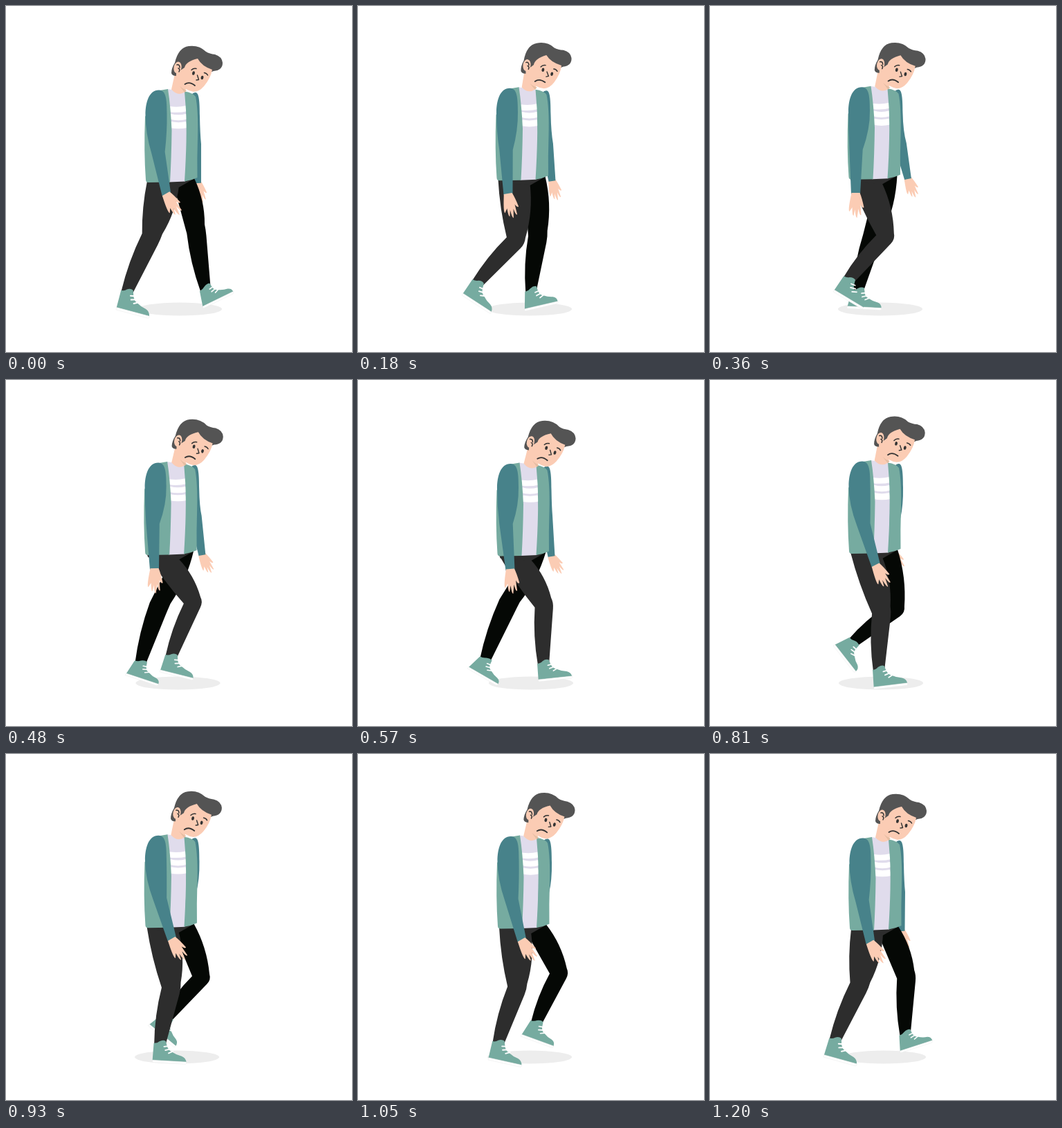
An HTML page for the animation above (1.23 s loop, 500 by 500 pixels).

```html
<!DOCTYPE html>
<html lang="en">
<head>
<meta charset="utf-8">
<title>Sad walk</title>
<style>
html, body { margin: 0; width: 100%; height: 100%; overflow: hidden; background: #fff; }
svg { display: block; width: 100vw; height: 100vh; }
.line { fill: none; stroke: #333; stroke-linecap: round; stroke-linejoin: round; }
.white { fill: none; stroke: #fff; }
</style>
</head>
<body>
<svg viewBox="0 0 500 500">
  <defs>
    <g id="shoe">
      <path fill="#76aba0" d="M0-3 L1-27 Q6-27 9-30 Q14-33 18-31 L20-25 Q22-18 28-16 Q35-12 42-11 Q48-9 49-3Z"/>
      <path fill="#fff" stroke="#e6e6e6" stroke-width=".4" d="M0-3.2 L49-3.2 Q50-1 48 0 L0 0Z"/>
      <path class="white" stroke-width="1.8" stroke-linecap="round" d="M16-23 L22-24 M18-18 L25-20 M23-14 L29-17"/>
    </g>
    <path id="hand" fill="#fbccb4" stroke-linejoin="round" d="M-6-2 L6-2 Q9 5 12 19 Q10 21 7 15 L8 30 Q6 32 4 21 L2 34 Q0 35 -1 22 L-3 31 Q-5 32 -5 19 L-9 25 Q-11 24 -8 8Z"/>
  </defs>

  <ellipse id="shadow" cy="438" rx="61" ry="9.5" fill="#ededed"/>
  <use id="farHand" href="#hand"/>
  <path id="farArm" fill="#47828a"/>
  <path id="farLeg" fill="#050805"/>
  <use id="farShoe" href="#shoe"/>
  <path id="nearLeg" fill="#2d2d2d"/>
  <use id="nearShoe" href="#shoe"/>

  <g id="torso">
    <path fill="#2d2d2d" d="M204 250 L272 245 L271 250 L250 262 L206 258Z"/>
    <path fill="#e0dcec" d="M233 120 L259 124 Q263 170 259 253.5 L236 254.5Z"/>
    <g class="white" stroke-width="8">
      <path d="M236 149 Q249 151 261 148"/>
      <path d="M237 159.5 Q249 163 261.500 159.500"/>
      <path stroke-width="9" d="M238 171.500 Q249 174 261 171.500"/>
    </g>
    <path fill="#76aba0" d="M222 122 L234 120 Q238 146 239.500 180 Q239 220 237 254.500 L206 255 Q202 255 202 251 Q199 210 201 160Z"/>
    <path fill="#76aba0" d="M258 123.500 Q270 125 274 131 Q278 150 277 190 Q276 220 276.500 248 Q268 252 258 253.500 Q262 190 260 150Z"/>
  </g>
  <path id="nearArm" fill="#47828a"/>
  <use id="nearHand" href="#hand"/>

  <g id="head">
    <path fill="#fbccb4" d="M244 98 L239 120.500 Q248 131 258 124.500 L263 112Z"/>
    <path fill="#545454" d="M246 101 Q240 101 239 97 Q239 90 244 82 Q249 60 264 58 Q279 56 289 66 Q294 69 302 70 Q312 73 313 82 Q313 93 300 94 L285 100 L258 100Z"/>
    <path fill="#fbccb4" d="M258 89 Q260 80 277 76 Q283 87 298 92 Q296 104 286 116 Q279 124 271 124 Q259 122 250 111 Q245 105 246 97Z"/>
    <path fill="#e5bda2" d="M251 115.500 Q255 120 261 122 L258 125Z"/>
    <ellipse cx="248" cy="89" rx="5.500" ry="8.500" fill="#fbccb4" transform="rotate(12 248 89)"/>
    <path class="line" stroke-width="1.500" d="M247 85 Q251 84 251 89 M249 90 Q252 91 250 95"/>
    <ellipse cx="271" cy="97" rx="1.900" ry="2.800" fill="#333" transform="rotate(15 271 97)"/>
    <ellipse cx="283.500" cy="103.500" rx="1.900" ry="2.800" fill="#333" transform="rotate(15 283.500 103.500)"/>
    <path class="line" stroke-width="1.500" d="M268 92.500 Q271 89.500 275 90.500 M286.500 96.500 Q290 97 291.500 100"/>
    <path class="line" stroke-width="1.400" d="M276.500 100 L278.500 106.500 L275 107"/>
    <path class="line" stroke-width="1.800" d="M258.500 113 Q265 108.500 273 115"/>
  </g>
</svg>
<script>
const LOOP = 1230, STEP = 30;
const $ = id => document.getElementById(id);

// time, knee x y, ankle x y, heel x y, sole angle
const nearLegKeys = [
  [0, 210, 333, 175, 413, 159, 439, 14.8],
  [180, 228, 339, 173, 400, 150, 418, 33],
  [270, 243, 336, 183, 392, 158, 407, 40],
  [360, 254, 334, 201, 395, 178, 413, 31],
  [465, 270, 322, 234, 398, 216, 420, 17],
  [570, 269, 325, 268, 409, 261, 436, -6],
  [660, 263, 328, 278, 411, 274, 438, -18],
  [810, 248, 336, 244, 418, 237, 447, -7],
  [1050, 230, 338, 203, 417, 188, 442, 12.5],
  [1200, 216, 334, 181, 413, 164, 438, 15.5]
];
const farLegKeys = [
  [0, 275, 326, 288, 408, 285, 437, -26],
  [180, 260, 333, 250, 411, 241, 441, -13],
  [360, 235, 333, 214, 411, 198, 437, 3],
  [570, 217, 323, 184, 404, 158, 417, 30],
  [690, 244, 331, 187, 390, 161, 403, 42],
  [810, 269, 331, 207, 379, 178, 384, 52],
  [1050, 291, 317, 258, 388, 235, 408, 20],
  [1200, 284, 322, 282, 404, 275, 432, -18]
];
// time, elbow x y, wrist x y, hand angle
const nearArmKeys = [
  [0, 220, 212, 232, 273, 30],
  [180, 214, 208, 217, 273, 10],
  [360, 211, 207, 210.5, 272, 0],
  [570, 214, 208, 220, 275, 4],
  [810, 222, 209, 240, 269, 27],
  [1050, 222, 211, 237, 270, 30],
  [1200, 220, 212, 232, 273.5, 30]
];
const farArmKeys = [
  [0, 273, 200, 277, 256, -12],
  [180, 273, 200, 280.5, 253, -14],
  [360, 275, 200, 286, 250, -20],
  [570, 272, 196, 279.5, 255, -28],
  [810, 266, 200, 264, 249, -26],
  [1050, 267, 200, 262, 248, -10],
  [1200, 273, 200, 276.5, 256, -12]
];
// time, torso x y, head x y, head angle, shadow x
const bodyKeys = [
  [0, 0, 0, 0, 0, 0, 251],
  [180, -1.5, -2.8, -2.4, -3.6, -3, 248],
  [360, -1.5, -4.3, -0.8, -4.4, -1, 246],
  [570, -0.5, -0.5, 0.6, 0.6, 1.5, 250],
  [810, -1, -4, -1.3, -4.6, -1.5, 247],
  [1050, 0, -2.6, 0.2, -1.8, 0.5, 248],
  [1200, 0, 0, 0, 0, 0, 251]
];

// cyclic cubic through the keys
function sample(keys, t) {
  const n = keys.length;
  let i = n - 1;
  while (keys[i][0] > t) i--;
  const key = j => keys[(j + n) % n];
  const time = j => key(j)[0] + LOOP * Math.floor(j / n);
  const t1 = time(i), t2 = time(i + 1), d = t2 - t1, u = (t - t1) / d;
  const a = u * u * (3 - 2 * u), b = u * (1 - u) * (1 - u), c = u * u * (u - 1);
  return key(i).slice(1).map((p, k) => {
    const v = j => key(j)[k + 1];
    const m1 = (v(i + 1) - v(i - 1)) / (t2 - time(i - 1));
    const m2 = (v(i + 2) - v(i)) / (time(i + 2) - t1);
    return p + (v(i + 1) - p) * a + d * (m1 * b + m2 * c);
  });
}

const mix = (a, b, u) => [a[0] + (b[0] - a[0]) * u, a[1] + (b[1] - a[1]) * u];
const unit = (a, b) => {
  const d = Math.hypot(b[0] - a[0], b[1] - a[1]);
  return [(b[0] - a[0]) / d, (b[1] - a[1]) / d];
};
// point beside p; positive w lies to the right of a limb heading down
const side = (p, dir, w) => [p[0] + dir[1] * w, p[1] - dir[0] * w];
const bulge = (a, b, w) => side(mix(a, b, 0.5), unit(a, b), w * 2);
const str = p => p[0].toFixed(2) + ' ' + p[1].toFixed(2);
const bisect = (a, b, c) => {
  const p = unit(a, b), q = unit(b, c);
  return unit([0, 0], [p[0] + q[0], p[1] + q[1]]);
};

function legPath(hipL, hipR, knee, ankle, w, fat) {
  const hip = mix(hipL, hipR, 0.5);
  const bend = bisect(hip, knee, ankle), shin = unit(knee, ankle);
  const end = [ankle[0] + shin[0] * 3, ankle[1] + shin[1] * 3];
  const kL = side(knee, bend, -14), kR = side(knee, bend, 14);
  const aL = side(end, shin, -w), aR = side(end, shin, w);
  const r1 = mix(kR, hipR, 0.1), r2 = mix(kR, aR, 0.1);
  return `M${str(hipL)} Q${str(bulge(hipL, kL, -fat))} ${str(kL)}` +
    ` Q${str(bulge(kL, aL, -2.5))} ${str(aL)} L${str(aR)} L${str(r2)}` +
    ` Q${str(kR)} ${str(r1)} Q${str(bulge(hipR, r1, 4))} ${str(hipR)}Z`;
}

function setLeg(name, keys, t, hipL, hipR, w, fat) {
  const [kx, ky, ax, ay, hx, hy, deg] = sample(keys, t);
  $(name + 'Leg').setAttribute('d', legPath(hipL, hipR, [kx, ky], [ax, ay], w, fat));
  // the sole follows its own angle while the collar stays on the ankle
  const c = Math.cos(deg * Math.PI / 180), s = Math.sin(deg * Math.PI / 180);
  const m = [c, s, (ax - hx - 10 * c) / -27, (ay - hy - 10 * s) / -27, hx, hy];
  $(name + 'Shoe').setAttribute('transform', `matrix(${m.map(v => v.toFixed(4))})`);
}

function setArm(name, keys, t, x, y, half, elbowW, wristW, size) {
  const [ex, ey, wx, wy, deg] = sample(keys, t);
  const E = [ex, ey], W = [wx, wy], top = [x, y + 36];
  const bend = bisect(top, E, W), low = unit(E, W);
  const eL = side(E, bend, -elbowW), eR = side(E, bend, elbowW);
  const wL = side(W, low, -wristW), wR = side(W, low, wristW);
  const l = x - half, r = x + half;
  $(name + 'Arm').setAttribute('d',
    `M${x + 4} ${y} C${l + 5} ${y} ${l} ${y + 18} ${l} ${y + 36}` +
    ` Q${l} ${y + 62} ${str(eL)} L${str(wL)} L${str(wR)} L${str(eR)}` +
    ` Q${r + 0.5} ${y + 60} ${r} ${y + 34} C${r} ${y + 14} ${r - 1} ${y} ${x + 4} ${y}Z`);
  $(name + 'Hand').setAttribute('transform',
    `translate(${str(W)}) rotate(${-deg * (name === 'near' ? 1 : -1)}) scale(${size})`);
}

function draw(t) {
  const [bx, by, hx, hy, tilt, sx] = sample(bodyKeys, t);
  const at = (x, y) => [x + bx, y + by];
  $('shadow').setAttribute('cx', sx.toFixed(2));
  $('torso').setAttribute('transform', `translate(${bx} ${by})`);
  $('head').setAttribute('transform', `translate(${hx} ${hy}) rotate(${tilt} 250 120)`);
  setLeg('near', nearLegKeys, t, at(204, 253), at(250, 260), 8, 2);
  setLeg('far', farLegKeys, t, at(242, 258), at(272, 249), 7.5, 0);
  setArm('near', nearArmKeys, t, 217 + bx, 121.5 + by, 15.5, 9.7, 6.5, 1);
  setArm('far', farArmKeys, t, 270 + bx, 125 + by, 10, 9, 5, 0.84);
}

function tick() {
  draw(Math.floor(performance.now() % LOOP / STEP) * STEP);
  requestAnimationFrame(tick);
}
tick();
</script>
</body>
</html>
```
